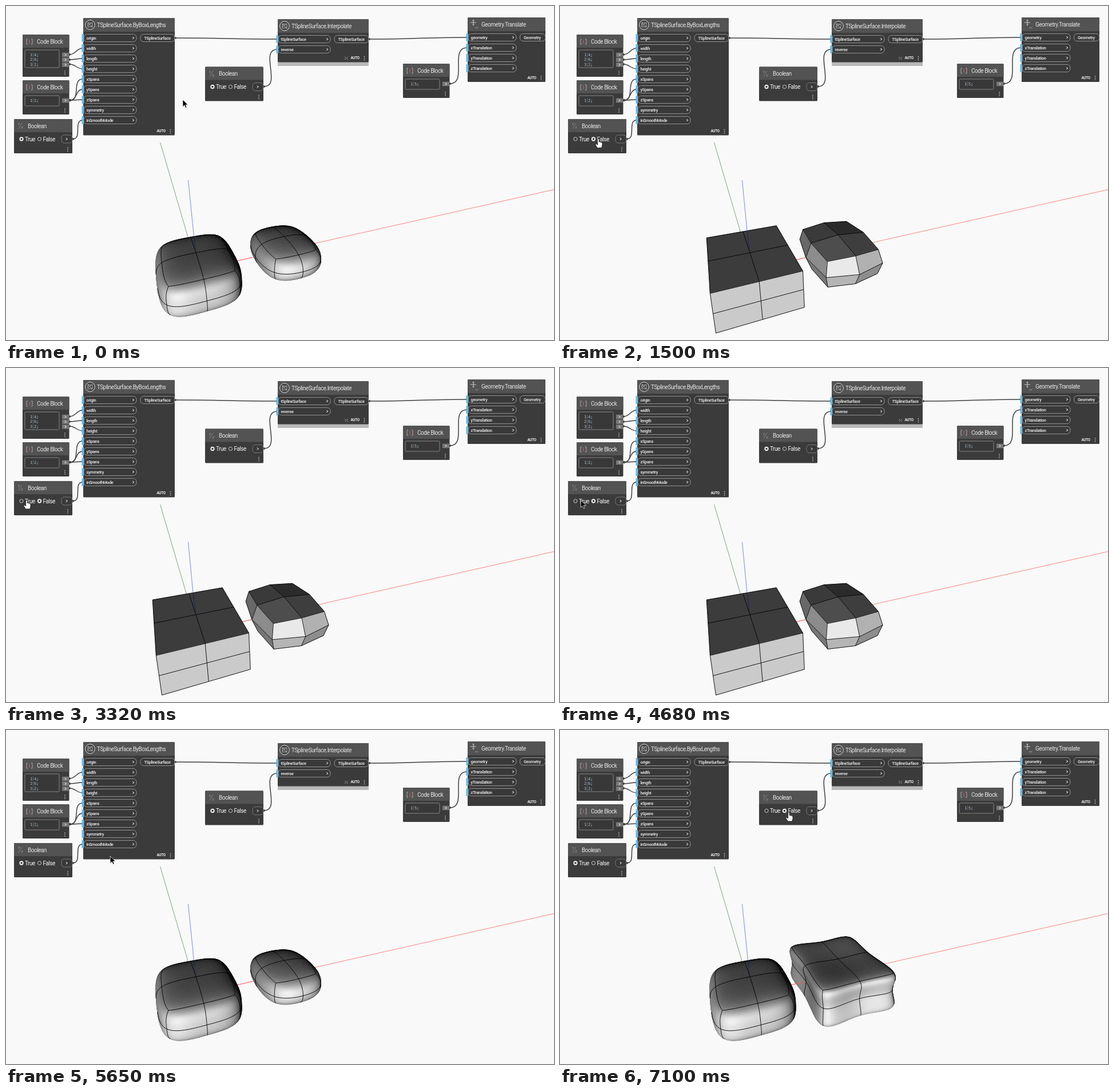
Recreate the animation shown at these times as an HTML page with a canvas. Size 958 by 585 pixels, loop 8 s.

```html
<!DOCTYPE html>
<html lang="en">
<head>
<meta charset="utf-8">
<title>Surface interpolation graph</title>
<style>
html, body { margin: 0; width: 100%; height: 100%; overflow: hidden; background: #f9f9f9; }
canvas, svg { position: absolute; left: 0; top: 0; }
text { font-family: Roboto, "Open Sans", sans-serif; letter-spacing: -.05em; fill: #eee; }
.title { font-size: 10px; fill: #e4e4e4; }
.port { font-size: 7.5px; font-weight: 500; }
.auto { font-size: 6.3px; font-weight: 700; }
.code { font: 7px "DejaVu Sans Mono", monospace; }
.tiny { font-size: 6px; fill: #aaa; }
</style>
</head>
<body>
<svg id="ui" width="958" height="585"></svg>
<script>
const LOOP = 8000, W = 958, H = 585;
const ui = document.getElementById('ui');

// ---- 3D shapes: 2x2x2 cages refined by Catmull-Clark ----
const AXES = [0, 1, 2];
const avg = list => AXES.map(d => list.reduce((s, p) => s + p[d], 0) / list.length);

// corner, edge, face: how far each kind of cage vertex sits from the centre
function cage(offset, corner, edge, face) {
  const V = [], F = [], reach = [0, face, edge, corner], half = [2, 3, 1];
  const id = p => (p[0] + 1) * 9 + (p[1] + 1) * 3 + p[2] + 1;
  for (let n = 0; n < 27; n++) {
    const p = [Math.floor(n / 9) - 1, Math.floor(n / 3) % 3 - 1, n % 3 - 1];
    const r = reach[p.filter(c => c).length];
    V.push(p.map((c, d) => c * r * half[d] + (d ? 0 : offset)));
  }
  for (const d of AXES) for (const side of [-1, 1]) for (const a of [-1, 0]) for (const b of [-1, 0]) {
    const v = [[a, b], [a + 1, b], [a + 1, b + 1], [a, b + 1]].map(([u, w]) => {
      const p = [];
      p[d] = side; p[(d + 1) % 3] = u; p[(d + 2) % 3] = w;
      return id(p);
    });
    F.push({ v: side > 0 ? v : v.reverse(), line: [1, 1, 1, 1] });
  }
  return { V, F };
}

function subdivide({ V, F }) {
  const centres = F.map(f => avg(f.v.map(i => V[i])));
  const ring = V.map(() => ({ f: [], e: [] })), edges = new Map();
  const key = (a, b) => Math.min(a, b) * V.length + Math.max(a, b);
  F.forEach((f, j) => f.v.forEach((a, i) => {
    const b = f.v[(i + 1) % 4], k = key(a, b);
    if (!edges.has(k)) edges.set(k, { pts: [V[a], V[b]] });
    edges.get(k).pts.push(centres[j]);
    ring[a].f.push(centres[j]);
    ring[a].e.push(avg([V[a], V[b]]));
  }));
  const out = V.map((p, i) => {
    const { f, e } = ring[i], n = f.length, q = avg(f), r = avg(e);
    return p.map((c, d) => (q[d] + 2 * r[d] + (n - 3) * c) / n);
  });
  for (const e of edges.values()) e.id = out.push(avg(e.pts)) - 1;
  const faces = [];
  F.forEach((f, j) => {
    const c = out.push(centres[j]) - 1;
    const mid = f.v.map((a, i) => edges.get(key(a, f.v[(i + 1) % 4])).id);
    f.v.forEach((a, i) => {
      const prev = (i + 3) % 4;
      faces.push({ v: [a, mid[i], c, mid[prev]], line: [f.line[i], 0, 0, f.line[prev]] });
    });
  });
  return { V: out, F: faces };
}

const refine = (mesh, n) => n ? refine(subdivide(mesh), n - 1) : mesh;

function project([x, y, z]) {
  const w = 1.0182 + .025 * x + .0503 * y - .0182 * z;
  return [(340.96 + 43 * x + 12.09 * y - 9 * z) / w, (470.4 + 3.76 * x + 7.47 * y - 38.2 * z) / w, w];
}

function shade(a, b) {
  const n = [a[1] * b[2] - a[2] * b[1], a[2] * b[0] - a[0] * b[2], a[0] * b[1] - a[1] * b[0]];
  const [x, y, z] = n.map(c => c / Math.hypot(...n));
  const shine = Math.max(0, -.26 * x - .85 * y + .45 * z) ** 10;
  const g = Math.round(Math.max(4, Math.min(245, 27 - 90 * x - 170 * y + 33 * z + 25 * shine)));
  return `rgb(${g},${g},${g})`;
}

function line(ctx, color, a, b) {
  ctx.strokeStyle = color;
  ctx.lineWidth = .75;
  ctx.beginPath();
  ctx.moveTo(a[0], a[1]);
  ctx.lineTo(b[0], b[1]);
  ctx.stroke();
}

function drawMesh(ctx, { V, F }) {
  const P = V.map(project), sub = (a, b) => a.map((c, d) => c - b[d]);
  const seen = [];
  for (const f of F) {
    const [p, q, r, s] = f.v.map(i => P[i]);
    if ((r[0] - p[0]) * (s[1] - q[1]) - (r[1] - p[1]) * (s[0] - q[0]) < 0)
      seen.push({ f, pts: [p, q, r, s], depth: p[2] + q[2] + r[2] + s[2] });
  }
  seen.sort((a, b) => b.depth - a.depth);
  ctx.lineWidth = .6;
  for (const { f, pts } of seen) {
    const [a, b, c, d] = f.v.map(i => V[i]);
    ctx.fillStyle = ctx.strokeStyle = shade(sub(c, a), sub(d, b));
    ctx.beginPath();
    pts.forEach(p => ctx.lineTo(p[0], p[1]));
    ctx.closePath();
    ctx.fill();
    ctx.stroke();
  }
  // shared edges are stroked once
  const done = new Set();
  ctx.strokeStyle = '#000';
  ctx.lineWidth = .9;
  ctx.beginPath();
  for (const { f, pts } of seen) f.line.forEach((on, i) => {
    const j = (i + 1) % 4, a = f.v[i], b = f.v[j];
    const key = Math.min(a, b) * V.length + Math.max(a, b);
    if (!on || done.has(key)) return;
    done.add(key);
    ctx.moveTo(pts[i][0], pts[i][1]);
    ctx.lineTo(pts[j][0], pts[j][1]);
  });
  ctx.stroke();
}

function scene(box, other, rim) {
  const canvas = document.createElement('canvas');
  canvas.width = W;
  canvas.height = H;
  document.body.insertBefore(canvas, ui);
  const ctx = canvas.getContext('2d'), origin = project([0, 0, 0]);
  ctx.lineJoin = 'round';
  const red = '#ff5a5a', top = project([0, 0, 1]);
  line(ctx, red, origin, [958, 321.5]);
  line(ctx, '#4f8a4f', [269.5, 239], origin);
  drawMesh(ctx, other);
  line(ctx, red, project([2, 0, 0]), project([3, 0, 0]));
  drawMesh(ctx, box);
  line(ctx, '#4a68e0', [318.5, 305], rim);
  line(ctx, '#14205f', rim, top);
  return canvas;
}

const plain = cage(0, 1, 1, 1), shrunk = cage(5, 3 / 4, 5 / 6, 1), grown = cage(5, 11 / 7, 8 / 7, 5 / 7);
const roundBox = refine(plain, 4);
const scenes = {
  smooth: scene(roundBox, refine(shrunk, 4), [328.5, 404]),
  flat: scene(plain, shrunk, [327, 394]),
  grown: scene(roundBox, refine(grown, 4), [328.5, 404])
};

// ---- Node graph ----
const rect = (x, y, w, h, fill, more = '') => `<rect x="${x}" y="${y}" width="${w}" height="${h}" fill="${fill}" ${more}/>`;
const text = (x, y, cls, s, more = '') => `<text x="${x}" y="${y}" class="${cls}" ${more}>${s}</text>`;
const path = (d, stroke, width = 1, more = '') => `<path d="${d}" fill="none" stroke="${stroke}" stroke-width="${width}" ${more}/>`;
const pill = (x, y, w) => rect(x, y - 6.5, w, 13, '#393939', 'rx="5.5" stroke="#a8a8a8" stroke-width=".8"');
const dots = (x, y) => [-3, 0, 3].map(d => `<circle cx="${x}" cy="${y + d}" r=".8" fill="#ddd"/>`).join('');
const chevron = (x, y, c = '#eee') => path(`M${x - 1.3} ${y - 1.8}l2.8 1.8l-2.8 1.8`, c);

const frame = (x, y, w, h, head, title, tx) =>
  rect(x, y, w, h, '#3b3b3b', 'rx="1.5"') + rect(x, y, w, head, '#535353', 'rx="1.5"') +
  text(tx, y + head / 2 + 4, 'title', title);

function codeBlock(x, y, lines) {
  const n = lines.length, boxH = n > 1 ? 31 : 18, h = n > 1 ? 74 : 60;
  let s = frame(x, y, 81.5, h, 23, 'Code Block', x + 25);
  s += path(`M${x + 9} ${y + 8}h-2v9h2M${x + 15} ${y + 8}h2v9h-2`, '#aaa') + path(`M${x + 12} ${y + 9}v7`, '#e0524a', 1.3);
  s += rect(x + 4, y + 27, 60, boxH, '#383838', 'rx="1.5" stroke="#9a9a9a" stroke-width=".8"');
  lines.forEach((v, i) => {
    const cy = y + 35.5 + i * 8.7;
    s += text(x + 13, cy + 2, 'code', i + 1, 'style="fill:#bbb"') +
      path(`M${x + 18.5} ${cy - 4}v8`, '#777', .7) +
      text(x + 20, cy + 2, 'code', `<tspan fill="#8cc8ee">${v}</tspan>;`);
    s += rect(x + 69, cy - 3.8, 12, 7.6, '#777') + chevron(x + 75, cy);
  });
  return s + dots(x + 74, y + h - 7);
}

function toggle(x, y, name) {
  const option = (dx, label) => `<circle id="${name}${label}" cx="${x + dx}" cy="${y + 35}" fill="none" stroke="#eee"/>` +
    text(x + dx + 6, y + 38.5, 'title', label, 'style="fill:#f4f4f4"');
  return frame(x, y, 102, 60, 23, 'Boolean', x + 24) +
    text(x + 7, y + 11, 'tiny', 'T') + text(x + 13, y + 17, 'tiny', 'F') +
    path(`M${x + 8} ${y + 17}l6 -10`, '#999', .7) +
    option(13, 'True') + option(44.5, 'False') +
    rect(x + 83, y + 28, 19, 14, '#393939', 'rx="5" stroke="#888" stroke-width=".8"') +
    chevron(x + 92, y + 35) + dots(x + 94, y + 53);
}

function operation(x, y, w, h, title, ports, first, portW, out, outW) {
  let s = frame(x, y, w, h, 24, title, x + 24);
  ports.forEach((name, i) => {
    const cy = first + i * 18;
    s += pill(x + 1, cy, portW) + rect(x - 2.5, cy - 7, 3.5, 14, '#62bce8') +
      text(x + 5.5, cy + 2.5, 'port', name) + chevron(x + portW - 4.5, cy);
  });
  s += pill(x + w - outW, first, outW) + text(x + w - outW + 6.5, first + 2.5, 'port', out);
  return s + text(x + w - 31.5, y + h - 5.5, 'auto', 'AUTO') + dots(x + w - 7.5, y + h - 7);
}

const surfaceIcon = (x, y) => `<circle cx="${x}" cy="${y}" r="8.3" fill="#444" stroke="#ddd"/>` +
  path(`M${x - 4} ${y - 4}q4 2 8 0v8q-4 -2 -8 0zM${x - 4} ${y - 4}l8 8M${x - 4} ${y + 1}q4 -1 6 -4`, '#ccc', .8);

function wire(x1, y1, x2, y2) {
  const k = .45 * Math.hypot(x2 - x1, y2 - y1);
  return path(`M${x1} ${y1}C${x1 + k} ${y1} ${x2 - k} ${y2} ${x2} ${y2}`, '#3f3f3f', 1.5) +
    `<circle cx="${x1}" cy="${y1}" r="2" fill="#444"/><circle cx="${x2}" cy="${y2}" r="2" fill="#444"/>`;
}

const wires = [
  [111, 85, 134, 74], [111, 94, 134, 92], [111, 102, 134, 110],
  [112, 165, 134, 128], [112, 165, 134, 146], [112, 165, 134, 164],
  [117, 233, 134, 200], [296, 56, 474, 58], [451, 141, 474, 76], [635, 58, 806, 55], [776, 136, 806, 73]
];

ui.innerHTML =
  wires.map(w => wire(...w)).join('') +
  codeBlock(29, 50, [4, 6, 2]) + codeBlock(29, 130, [2]) + codeBlock(694, 101, [5]) +
  toggle(14, 198, 'smooth') + toggle(348, 106.5, 'reverse') +
  operation(135, 21, 160, 205.5, 'TSplineSurface.ByBoxLengths',
    ['origin', 'width', 'length', 'height', 'xSpans', 'ySpans', 'zSpans', 'symmetry', 'inSmoothMode'], 56, 92, 'TSplineSurface', 60) +
  surfaceIcon(147, 33) +
  rect(475, 98, 159, 7, '#b9b9b9') +
  operation(475, 23, 159, 75.5, 'TSplineSurface.Interpolate', ['tSplineSurface', 'reverse'], 58, 91, 'TSplineSurface', 60) +
  surfaceIcon(487, 35) +
  path('M592 89l6 5M594 94l-2 -2M596 89l2 2', '#aaa', .8) +
  operation(807, 20, 136, 113, 'Geometry.Translate', ['geometry', 'xTranslation', 'yTranslation', 'zTranslation'], 55, 84, 'Geometry', 44.5) +
  path('M817 24v10M812 29h10M815.5 25.5l1.5 -1.5l1.5 1.5M815.5 32.5l1.5 1.5l1.5 -1.5', '#ccc') +
  text(820, 39, 'tiny', 'xyz', 'style="font-size:4px"') +
  `<path id="arrow" d="M0 0V12.5L3 9.8L5 14.4L7 13.5L5.1 9H9Z" fill="#000" stroke="#fff" stroke-width=".7"/>
   <path id="hand" d="M-1.4 1Q0 -1 1.3 1V5.6Q2.6 4.7 3.6 6Q4.8 5.3 5.6 6.6Q7 6.2 7 8V11.5L5.6 16H-1.6L-5 10.6Q-5.4 8.6 -3.2 9.2L-1.4 11Z" fill="#fff" stroke="#111" stroke-width=".8"/>`;

// ---- Timeline ----
const track = [
  [460, 309, 164], [560, 258, 178], [700, 165, 206], [830, 85, 229], [890, 67, 232.5],
  [2880, 67, 232.5], [3320, 36, 231],
  [5260, 36.5, 232], [5450, 75, 237], [5750, 235, 213], [6060, 355, 174],
  [6090, 356, 172], [6250, 395, 153], [6490, 400, 144]
];
const within = (t, a, b) => t >= a && t < b;
const el = id => document.getElementById(id);

function cursorAt(t) {
  const next = track.findIndex(k => k[0] > t);
  if (next === 0) return track[0].slice(1);
  if (next < 0) return track[track.length - 1].slice(1);
  const a = track[next - 1], b = track[next], f = (t - a[0]) / (b[0] - a[0]);
  return [a[1] + (b[1] - a[1]) * f, a[2] + (b[2] - a[2]) * f];
}

function setRadio(id, on) {
  el(id).setAttribute('r', on ? 2.7 : 3.1);
  el(id).setAttribute('stroke-width', on ? 1.9 : .8);
}

function setToggle(name, value) {
  setRadio(name + 'True', value);
  setRadio(name + 'False', !value);
}

function draw() {
  const t = performance.now() % LOOP;
  const shown = within(t, 1440, 4900) ? 'flat' : t >= 7050 ? 'grown' : 'smooth';
  for (const name in scenes) scenes[name].style.visibility = name === shown ? 'visible' : 'hidden';
  setToggle('smooth', !within(t, 1330, 4740));
  setToggle('reverse', t < 6950);

  const [x, y] = cursorAt(t);
  const busy = within(t, 1270, 1500) || within(t, 4680, 4960) || within(t, 6900, 7100);
  const over = (x < 90 && within(y, 227, 240)) || (within(x, 357, 421) && within(y, 136, 149));
  const hand = over && !busy;
  el('hand').setAttribute('visibility', hand ? 'visible' : 'hidden');
  el('arrow').setAttribute('visibility', hand ? 'hidden' : 'visible');
  el(hand ? 'hand' : 'arrow').setAttribute('transform', `translate(${x} ${y})`);
  requestAnimationFrame(draw);
}
draw();
</script>
</body>
</html>
```
